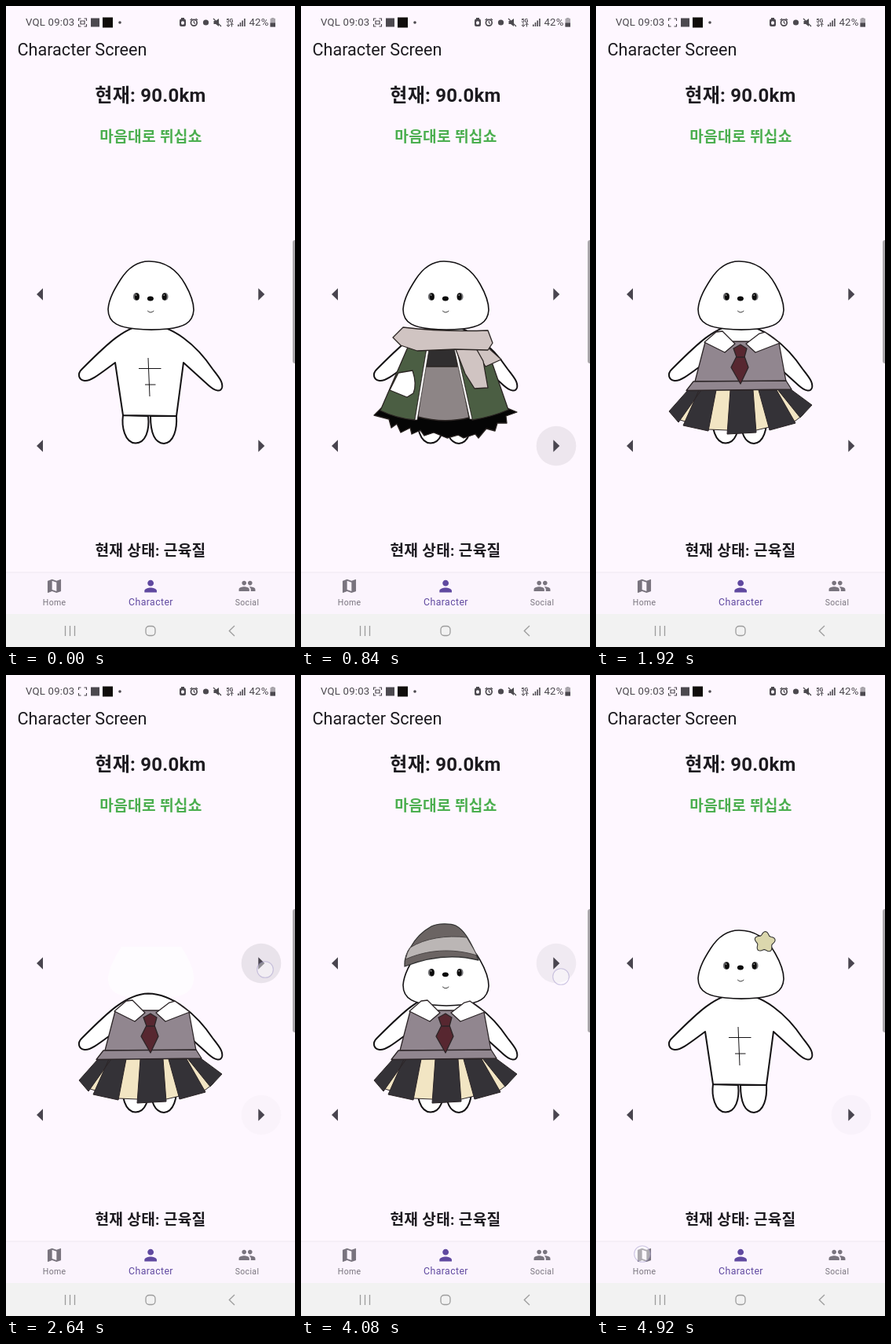
Recreate the animation shown at these times as an HTML page with a canvas. Size 368 px wide and 816 px high, loop 5040 ms.

```html
<!DOCTYPE html>
<html lang="ko">
<head>
<meta charset="utf-8">
<title>Character Screen</title>
<style>
html, body { margin: 0; width: 100%; height: 100%; overflow: hidden; background: #fef7ff; }
canvas, svg { position: absolute; left: 0; top: 0; width: 368px; height: 816px; display: block; }
text { font-family: Roboto, "Noto Sans CJK KR", "Noto Sans CJK", sans-serif; fill: #1d1b20; }
.mid { text-anchor: middle; }
.bold { font-weight: 700; letter-spacing: .25px; }
.bar { font-size: 13.2px; letter-spacing: .2px; fill: #4c494f; }
.tab { font-size: 10.5px; letter-spacing: .35px; fill: #79747e; }
.on { font-size: 12.3px; letter-spacing: .4px; fill: #6049a0; }
</style>
</head>
<body>
<canvas id="c"></canvas>
<svg viewBox="0 0 368 816">
  <text class="bar" x="25" y="25.3">VQL 09:03</text>
  <text class="bar" x="309.5" y="25.3">42%</text>
  <text x="14.5" y="63" font-size="21.6">Character Screen</text>
  <text class="mid bold" x="184" y="121.5" font-size="24">현재: 90.0km</text>
  <text class="mid bold" x="184.5" y="173" font-size="19.2" style="fill:#4caf50">마음대로 뛰십쇼</text>
  <text class="mid bold" x="184" y="700" font-size="19.2">현재 상태: 근육질</text>
  <text class="mid tab" x="61.7" y="763">Home</text>
  <text class="mid on" x="184.5" y="763">Character</text>
  <text class="mid tab" x="307" y="763">Social</text>
</svg>
<script>
const LOOP = 5040, STEP = 120, INK = '#141214';
const cv = document.getElementById('c'), g = cv.getContext('2d');
const dpr = window.devicePixelRatio || 1;
cv.width = 368 * dpr;
cv.height = 816 * dpr;

function shape(d, fill, stroke, w = 1.3) {
  const p = new Path2D(d);
  if (fill) { g.fillStyle = fill; g.fill(p); }
  if (stroke) { g.strokeStyle = stroke; g.lineWidth = w; g.stroke(p); }
}
function oval(x, y, rx, ry, fill, stroke, w = 1) {
  g.beginPath();
  g.ellipse(x, y, rx, ry, 0, 0, 7);
  if (fill) { g.fillStyle = fill; g.fill(); }
  if (stroke) { g.strokeStyle = stroke; g.lineWidth = w; g.stroke(); }
}
function rect(x, y, w, h, fill) {
  g.fillStyle = fill;
  g.fillRect(x, y, w, h);
}
function at(x, y, s, draw) {
  g.save();
  g.translate(x, y);
  g.scale(s, s);
  draw();
  g.restore();
}

// Body and outfits
const BODY = 'M96 463C126 433 152 406 181 405.5C212 406 243 432 263 462C270 471 277 479 275 486C273 492 266 490 258 483L226 454 217 522 149 521 139 454C120 468 108 478 100 477C92 476 91 468 96 463Z';

function body() {
  shape('M149 521C147 535 151 556 165 556.5C178 556 183 540 181 522ZM184 522C184 540 187 556 201 557C214 556 218 538 217 522Z', '#fff', INK, 2);
  shape(BODY, '#fff', INK, 2);
}

const OUTFITS = {
  bare() {
    shape('M181 448L183 497M169 461.5H197.5M177 482H190.5', null, INK, 1);
  },
  robe() {
    const line = '#3b2e2a';
    shape('M134 417L93 531Q137 549 184 549Q234 548 276 531L237 418 196 436 183 431 160 420Z', '#a9c1b3', line, 1.5);
    shape('M142 483L129 541 133 542ZM181 484V548H184ZM227 492L242 545 245 544Z', '#fff', line, 1.4);
    shape('M229 412L237 419 196 437 182 431Z', '#fff', line);
    shape('M141 410L208 442 203 453 133 418Z', '#fff', line);
  },
  coat() {
    const line = '#2a2422';
    shape('M102 512L93 521 112 526 115 537 122 532 127 543 139 537 141 545 152 540 157 547 169 543 186 550 200 546 207 550 222 545 226 550 236 538 247 541 250 531 262 531 261 522 275 517 263 512 200 500Z', '#050505', line);
    shape('M159 440H198L214 524Q182 532 149 523Z', '#8d8586', line);
    shape('M162 436H196L199 459H159Z', '#302e2f', line);
    shape('M137 432L101 515Q122 525 145 527L160 436Z', '#4b5e43', line);
    shape('M198 436L218 527Q243 523 264 514L237 436Z', '#4b5e43', line);
    shape('M160 436L145 527 148 527 163 437ZM195 436L215 526 218 526 198 436Z', '#fff', line, .7);
    shape('M124 467L142 464C146 476 146 486 143 493L135 498 113 489Z', '#fff', line);
    shape('M221 436L236 433 255 450 235 459Z', '#d0c4c2', line);
    shape('M197 437L223 436 232 452 238 486 221 487 209 468Z', '#d0c4c2', line);
    shape('M117 422L130 409Q180 415 238 413L244 429 238 438 196 437 148 439 127 432Z', '#d0c4c2', line);
  },
  uniform() {
    const line = '#2c2527';
    shape('M117 489L104 526 120 531 143 539 167 540 204 540 221 536 254 528 263 521 270 510 248 488Z', '#f2e5c3', line, 1);
    shape('M117 489H134L105 530 93 516ZM131 489H153L143 541 111 534ZM171 489H200L204 543 167 545ZM207 489H230L254 531 221 540ZM231 488H248L275 508 260 524Z', '#343237', line, 1);
    shape('M139 428L126 478H242L233 429 193 427H175Z', '#91868f', line);
    shape('M124 478L242 477 249 488 115 489.5Z', '#91868f', line);
    shape('M138 428L153 415 161 414 177 430 164 441ZM191 430L208 417 215 415 234 429 203 441Z', '#fff', line);
    shape('M179 446L172 460 184 481 194 460 189 446Z', '#572730', line);
    shape('M184 431L192 436 189 447H179L175 436Z', '#572730', line);
  }
};

// Heads and hats
const HEAD = 'M182 325C205 325 219 338 228 354C236 368 239 377 239 387C238 404 225 409 206 411C192 412.5 178 412.5 165 411C146 409 130 405 130 386C131 372 139 359 146 348C155 334 167 325 182 325Z';

function face(x, y, gap) {
  for (const s of [-1, 1]) {
    const ex = x + s * gap;
    oval(ex + s * .6, y, 4, 5, '#77777a');
    oval(ex - s * .4, y, 3, 4.6, '#0c0c0c');
    oval(ex - .8, y - 2, .8, .8, '#ddd');
  }
  oval(x - .3, y + 2.5, 4, 2.9, '#0a0a0a');
  shape(`M${x - 4} ${y + 18}Q${x} ${y + 22} ${x + 4} ${y + 18}`, null, '#333', 1);
}
function plainHead() {
  shape(HEAD, '#fff', INK, 1.6);
  face(184.2, 370, 17.8);
}

const HEADS = {
  plain: plainHead,
  beanie() {
    shape('M144 355C135 369 129 382 130 392C132 406 148 410 165 412C185 413 200 412 210 409C224 405 228 397 226 385C225 375 222 367 219 358Z', '#fff', INK, 1.6);
    face(178.4, 375.5, 16.4);
    oval(227, 353, 12.2, 12.8, '#dfdad9', '#444');
    shape('M144 357L147.5 330C165 323 195 323 210 326C220 329 222 337 223 345C224 352 223 358 219 363C190 364 165 361 144 357Z', '#dfdad9', '#444', 1.1);
  },
  beret() {
    at(0, 8.8, 1, plainHead);
    shape('M132 371C131 362 135 352 140 346C147 333 157 325 166 320C174 316 190 316 197 319C208 325 214 337 219 347L226 363C195 355 165 358 132 371Z', '#6b6463', '#333');
    shape('M139 347C158 335 185 331 211 334L221 351 224 357C192 347 160 350 133 362Q135 353 139 347Z', '#bbb6b5', '#4a4545', 1);
  },
  flower() {
    plainHead();
    g.beginPath();
    for (let a = 0; a < 6.28; a += .1) {
      const r = 11.5 + 1.9 * Math.cos(5 * (a + .25));
      g.lineTo(215 + r * Math.cos(a), 340 + r * Math.sin(a));
    }
    g.closePath();
    g.fillStyle = '#dbd7ad';
    g.fill();
    g.strokeStyle = '#333';
    g.lineWidth = 1.1;
    g.stroke();
  }
};

// Timeline
const WEAR = [[0, 'bare'], [360, 'robe'], [840, 'coat'], [1320, 'uniform'], [4560, 'bare']];
const HATS = [[0, 'plain'], [2640, 'ghost'], [2760, 'beanie'], [3720, 'beret'], [4200, 'flower']];
const now = (list, t) => list.filter(e => e[0] <= t).pop()[1];

// x, y, press, release
const TAPS = [
  [43, 560, 200, 360], [325, 560, 660, 780], [325, 560, 1080, 1320], [325, 560, 2130, 2340],
  [325, 367, 2520, 2700], [325, 367, 3110, 3270], [325, 367, 3570, 3720],
  [325, 367, 4010, 4140], [325, 560, 4460, 4630]
];
// x, y, shown, hidden
const TOUCHES = [
  [43, 570, 200, 350], [322, 570, 560, 760], [328, 571, 1080, 1310], [325, 571, 2130, 2330],
  [330, 375, 2520, 2700], [330, 378, 3110, 3260], [330, 381, 3570, 3710],
  [331, 384, 4010, 4140], [325, 572, 4460, 4620], [59, 737, 4860, 5040]
];

function ripples(t) {
  for (const [x, y, on, off] of TAPS) {
    const k = Math.min(1, (t - on) / 110) * Math.min(1, 1 - (t - off) / 360);
    if (t > on && k > 0) oval(x, y, 25.3, 25.3, `rgba(73,69,79,${.115 * k})`);
  }
}
function touches(t) {
  for (const [x, y, on, off] of TOUCHES)
    if (t >= on && t < off) oval(x, y, 10.3, 10.3, 'rgba(255,255,255,.4)', 'rgba(150,140,195,.45)', 1.1);
}

function statusBar(t) {
  const c = '#4c494f';
  shape('M92.5 19V16H95.5M99.5 16H102.5V19M102.5 23V26H99.5M95.5 26H92.5V23', null, c, 1.1);
  if (t < 960 || t >= 3840) shape('M95 19H100V23H95Z', null, c, 1.2);
  rect(108, 15.5, 11, 11, c);
  rect(123, 14.5, 13, 13, '#100d0b');
  oval(145, 21, 1.8, 1.8, c);
  g.fillStyle = c;
  g.beginPath();
  g.roundRect(221, 16.5, 8, 9.5, 2);
  g.fill();
  rect(223, 15, 4, 2, c);
  oval(225, 21.5, 2, 2.3, '#fef7ff');
  oval(239.3, 21.3, 3.9, 3.9, null, c, 1.7);
  shape('M239.3 19V21.5L241 22.5M234.6 18L237 16M244 18L241.6 16', null, c, 1.2);
  oval(254.5, 21, 3.6, 3.6, c);
  shape('M264.5 19H267L271 16V26L267 23H264.5Z', c);
  shape('M264 16L274 26', null, c, 1.3);
  g.font = '700 7px Roboto, sans-serif';
  g.fillText('5G', 280.5, 20.5);
  shape('M283 21.5V26M281 24L283 26.3 285 24M287.5 26.5V22M285.5 24L287.5 21.7 289.5 24', null, c, 1);
  for (let i = 0; i < 4; i++) rect(295 + i * 2.7, 23.5 - i * 2.5, 1.6, 2.5 + i * 2.5, c);
  rect(336.5, 16, 6.5, 10.5, '#aaa6ac');
  rect(338, 15, 3.5, 1, '#aaa6ac');
  rect(336.5, 21.5, 6.5, 5, c);
}

const MAP = 'M20.5 3l-.16.03L15 5.1 9 3 3.36 4.9c-.21.07-.36.25-.36.48V20.5c0 .28.22.5.5.5l.16-.03L9 18.9l6 2.1 5.64-1.9c.21-.07.36-.25.36-.48V3.5c0-.28-.22-.5-.5-.5zM15 19l-6-2.11V5l6 2.11V19z';
const PERSON = 'M12 12c2.21 0 4-1.79 4-4s-1.79-4-4-4-4 1.79-4 4 1.79 4 4 4zm0 2c-2.67 0-8 1.34-8 4v2h16v-2c0-2.66-5.33-4-8-4z';
const GROUP = 'M16 11c1.66 0 3-1.34 3-3s-1.34-3-3-3-3 1.34-3 3 1.34 3 3 3zm-8 0c1.66 0 3-1.34 3-3S9.66 5 8 5 5 6.34 5 8s1.34 3 3 3zm0 2c-2.33 0-7 1.17-7 3.5V19h14v-2.5c0-2.33-4.67-3.5-7-3.5zm8 0c-.29 0-.62.02-.97.05 1.16.84 1.97 1.97 1.97 3.45V19h6v-2.5c0-2.33-4.67-3.5-7-3.5z';

function navigation() {
  rect(0, 721, 368, 53, '#fbf4fd');
  rect(0, 720.5, 368, 1, '#efe8f1');
  rect(0, 774, 368, 42, '#f2f2f2');
  at(50.1, 727, .95, () => shape(MAP, '#79747e'));
  at(172.4, 726.8, .98, () => shape(PERSON, '#6049a0'));
  at(295.6, 727, .95, () => shape(GROUP, '#79747e'));
  const c = '#9c9c9c';
  shape('M75.5 789V802M81.5 789V802M87.5 789V802M291 789L284.3 795.5 291 802', null, c, 1.3);
  g.beginPath();
  g.roundRect(178, 789.5, 12, 12, 4.2);
  g.stroke();
}

function arrows() {
  for (const y of [367, 560])
    shape(`M47 ${y - 7.7}V${y + 7.7}L39 ${y}ZM321.3 ${y - 7.7}V${y + 7.7}L329.3 ${y}Z`, '#49454f');
}

function character(t) {
  const hat = now(HATS, t);
  g.lineJoin = 'round';
  if (hat === 'ghost') {
    g.save();
    g.beginPath();
    g.rect(120, 346, 130, 80);
    g.clip();
    shape(HEAD, 'rgba(255,255,255,.65)');
    g.restore();
  }
  body();
  if (HEADS[hat]) HEADS[hat]();
  OUTFITS[now(WEAR, t)]();
  g.lineJoin = 'miter';
}

function frame(ms) {
  const t = Math.floor(ms % LOOP / STEP) * STEP;
  g.setTransform(dpr, 0, 0, dpr, 0, 0);
  rect(0, 0, 368, 816, '#fef7ff');
  statusBar(t);
  ripples(t);
  arrows();
  character(t);
  g.fillStyle = '#aaa7ab';
  g.beginPath();
  g.roundRect(365, 298, 6, 157, 3);
  g.fill();
  navigation();
  touches(t);
}

const start = performance.now();
(function tick() {
  frame(performance.now() - start);
  requestAnimationFrame(tick);
})();
</script>
</body>
</html>
```
